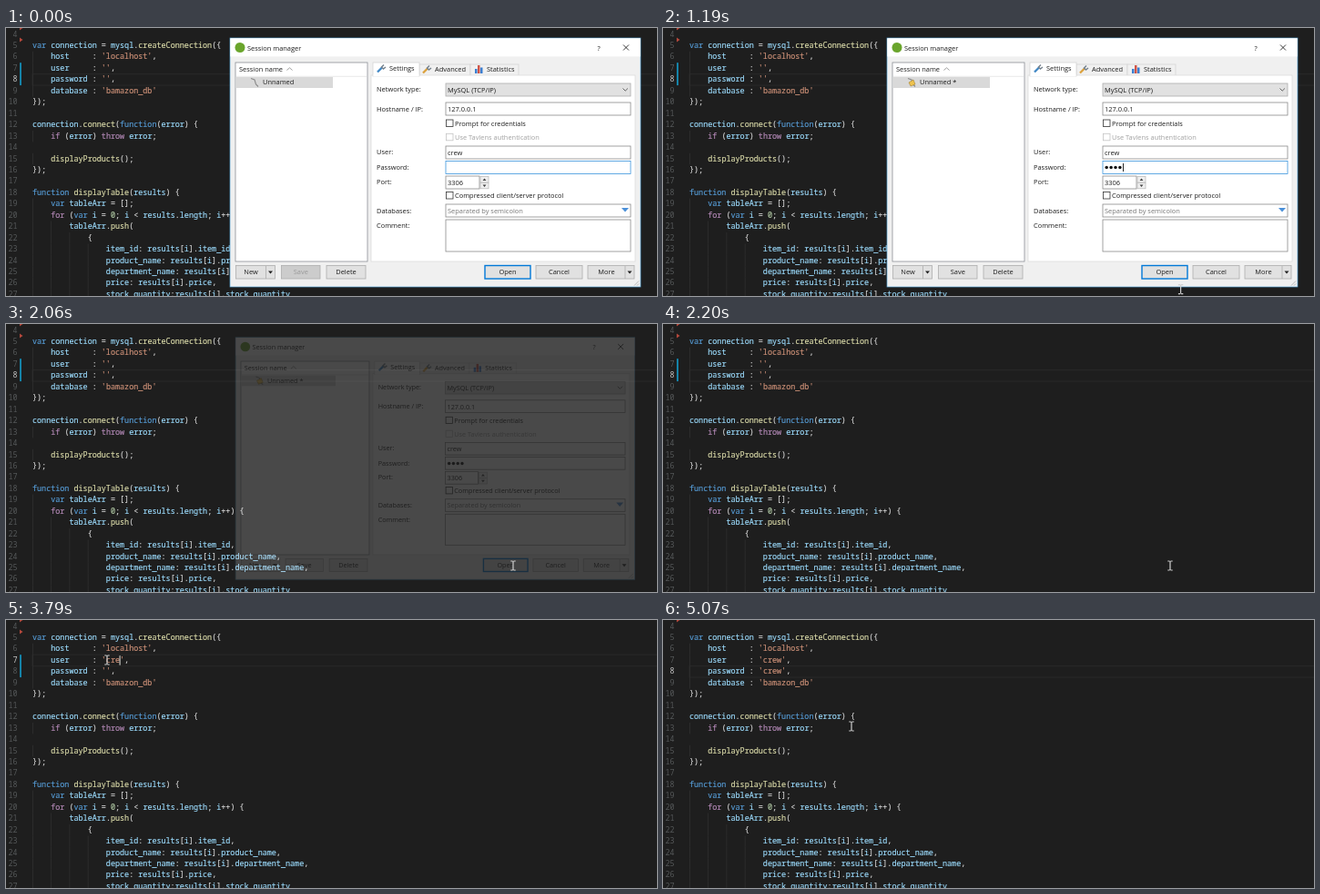
Animation of 715 by 295 pixels, one loop 5.09 s. Source, as an HTML page:

```html
<!DOCTYPE html>
<html lang="en">
<head>
<meta charset="utf-8">
<title>Session setup</title>
<style>
html, body { margin: 0; width: 100%; height: 100%; overflow: hidden; background: #1e1e1e; }
svg { display: block; width: 715px; height: 295px; }
text { white-space: pre; }
.code { font: 8.43px "Noto Sans Mono", "DejaVu Sans Mono", monospace; }
.ui { font: 7.45px "Open Sans", "Noto Sans", sans-serif; }
</style>
</head>
<body>
<svg id="stage" viewBox="0 0 715 295"></svg>
<script>
(() => {
const LOOP = 5090, CHAR = 5.058, LINE = 12.45, LEFT = 29;
const NAME = 'crew';
const stage = document.getElementById('stage');

function add(parent, tag, attrs, text) {
  const el = document.createElementNS('http://www.w3.org/2000/svg', tag);
  for (const key in attrs) el.setAttribute(key, attrs[key]);
  if (text !== undefined) el.textContent = text;
  parent.appendChild(el);
  return el;
}
const set = (el, attrs) => { for (const key in attrs) el.setAttribute(key, attrs[key]); };
const show = (el, on) => el.setAttribute('visibility', on ? 'visible' : 'hidden');
const group = parent => add(parent, 'g', {});
const rect = (p, x, y, width, height, fill, stroke = 'none', sw = 0.8) =>
  add(p, 'rect', { x, y, width, height, fill, stroke, 'stroke-width': sw });
const path = (p, d, stroke, sw = 1, fill = 'none') =>
  add(p, 'path', { d, stroke, 'stroke-width': sw, fill });
const label = (p, x, y, text, fill = '#1c1c1c', anchor = 'start') =>
  add(p, 'text', { x, y, fill, 'text-anchor': anchor, class: 'ui' }, text);

// ---- code editor ----
const userLine = s => `    user     : '${s}',`;
const passLine = s => `    password : '${s}',`;
const source = [
  '',
  'var connection = mysql.createConnection({',
  "    host     : 'localhost',",
  userLine(''),
  passLine(''),
  "    database : 'bamazon_db'",
  '});',
  '',
  'connection.connect(function(error) {',
  '    if (error) throw error;',
  '',
  '    displayProducts();',
  '});',
  '',
  'function displayTable(results) {',
  '    var tableArr = [];',
  '    for (var i = 0; i < results.length; i++) {',
  '        tableArr.push(',
  '            {',
  '                item_id: results[i].item_id,',
  '                product_name: results[i].product_name,',
  '                department_name: results[i].department_name,',
  '                price: results[i].price,',
  '                stock_quantity:results[i].stock_quantity'
];
const token = /('[^']*')|\b(var|function)\b|\b(if|throw|for)\b|(\w+)(?=\()|\b(\d+)\b|(\w+)|([^\w']+)/g;
const tints = ['#ce9178', '#569cd6', '#b58ab8', '#dcdcaa', '#b5cea8', '#9cdcfe', '#d4d4d4'];
const baseline = n => 22 + LINE * (n - 5);
const rowTop = n => baseline(n) - 8.7;

function paint(el, line) {
  if (el.shown === line) return;
  el.shown = line;
  el.textContent = '';
  for (const m of line.matchAll(token)) {
    const kind = m.slice(1).findIndex(part => part !== undefined);
    add(el, 'tspan', { fill: tints[kind], stroke: tints[kind] }, m[0]);
  }
}

rect(stage, 0, 0, 715, 295, '#1e1e1e');
const current = rect(stage, LEFT, 0, 690, LINE, 'none', '#292929', 1);
const numbers = {}, lines = {};
source.forEach((line, i) => {
  const n = i + 4, y = baseline(n);
  for (let col = 0; col < line.search(/\S/); col += 4)
    rect(stage, LEFT + col * CHAR, rowTop(n), 0.8, LINE, '#303030');
  numbers[n] = add(stage, 'text', { x: 12.5, y, 'text-anchor': 'end', class: 'code' }, n);
  lines[n] = add(stage, 'text', { x: LEFT, y, class: 'code', 'stroke-width': 0.15 });
  paint(lines[n], line);
});
const changed = rect(stage, 15, 0, 2, LINE, '#1583a8');
path(stage, 'M15 -2L18.5 0L15 2.5Z', 'none', 0, '#b5483c');
const removed = path(stage, 'M15 10.5L18.5 13L15 15.5Z', 'none', 0, '#b5483c');
const caret = rect(stage, 0, 0, 1.2, 10.5, '#c4c4c0');

// ---- session dialog ----
const dialog = group(stage);
rect(dialog, 246, 11, 451, 274, '#f0f0f0', '#4f9fd0', 0.7);
rect(dialog, 246.4, 11.4, 450.2, 20, '#fff');
add(dialog, 'circle', { cx: 257, cy: 21.5, r: 5.5, fill: '#6aa52c' });
label(dialog, 265, 24.5, 'Session manager');
label(dialog, 651, 25, '?', '#222', 'middle');
path(dialog, 'M678 18.5l6 6m0 -6l-6 6', '#222', 0.9);

rect(dialog, 252, 38, 145, 219, '#fff', '#8c9096');
path(dialog, 'M253 53.3H396', '#e4e4e4', 0.8);
path(dialog, 'M308.5 46.5l3 -2.7l3 2.7', '#777', 0.7);
label(dialog, 256, 48, 'Session name');
rect(dialog, 252.5, 54, 106.5, 12, '#d9d9d9');
path(dialog, 'M269 55.5l4 1.5l1.5 5l2.5 2.5', '#8a8a8a', 1.1);
const pencil = path(dialog, 'M270 60l5 -3l2 5l-5 2Z', '#94711f', 0.5, '#efc34e');
const session = label(dialog, 282, 62.3, 'Unnamed');

rect(dialog, 454, 40, 56, 12.5, '#f0f0f0', '#d5d5d5');
rect(dialog, 510, 40, 53, 12.5, '#f0f0f0', '#d5d5d5');
rect(dialog, 401, 52, 290, 205, '#fff', '#dcdcdc');
rect(dialog, 403, 38, 51, 15, '#fff', '#d5d5d5');
rect(dialog, 403.5, 51.3, 50, 2, '#fff');
function wrench(x, y, handle) {
  path(dialog, `M${x - 4} ${y + 4}L${x + 1} ${y - 1}`, handle, 2.3);
  path(dialog, `M${x + 3} ${y - 4}l-2.5 2.5l2 2l2.5 -2`, '#75828e', 1.5);
}
wrench(412, 44.5, '#3f87c5');
wrench(462, 45.5, '#dba13c');
rect(dialog, 515, 45, 2.5, 5, '#3c7fd0');
rect(dialog, 518, 41, 2.5, 9, '#d05548');
rect(dialog, 521, 43.5, 2.5, 6.5, '#3c7fd0');
label(dialog, 421, 47.3, 'Settings');
label(dialog, 471, 48, 'Advanced');
label(dialog, 528, 48, 'Statistics');

[['Network type:', 70], ['Hostname / IP:', 91.5], ['User:', 139], ['Password:', 156],
 ['Port:', 172], ['Databases:', 203.5], ['Comment:', 220]]
  .forEach(([text, y]) => label(dialog, 407, y, text));

const field = (y, h = 14, w = 203) => rect(dialog, 483, y, w, h, '#fff', '#8a8a8a');
set(field(61), { fill: '#e1e1e1', stroke: '#adadad' });
label(dialog, 485, 70.5, 'MySQL (TCP/IP)');
path(dialog, 'M677.5 66.5l2.7 2.7l2.7 -2.7', '#555', 0.9);
field(82);
label(dialog, 485, 92, '127.0.0.1');
field(130);
label(dialog, 485, 139.5, NAME);
const password = field(146.5);
const dots = [0, 1, 2, 3].map(i =>
  add(dialog, 'circle', { cx: 487.2 + i * 4.9, cy: 153.6, r: 1.75, fill: '#111' }));
const inputCaret = rect(dialog, 505, 149, 0.9, 9, '#111');
field(163, 14, 37);
label(dialog, 485, 172.8, '3306');
for (const y of [163.5, 170.3]) rect(dialog, 521, y, 9, 6.5, '#f0f0f0', '#b5b5b5', 0.7);
path(dialog, 'M523.5 168l2 -2.4l2 2.4ZM523.5 172.5l2 2.4l2 -2.4Z', 'none', 0, '#444');
field(194);
label(dialog, 485, 203.8, 'Separated by semicolon', '#777');
path(dialog, 'M676 198h8l-4 4.5Z', 'none', 0, '#4a8fd8');
field(211, 35);

function check(y, text, off) {
  rect(dialog, 483.5, y, 7.5, 7.5, '#fff', off ? '#c4c4c4' : '#333');
  label(dialog, 493, y + 6.6, text, off ? '#a0a0a0' : undefined);
}
check(101, 'Prompt for credentials');
check(116.3, 'Use Tavlens authentication', true);
check(180.5, 'Compressed client/server protocol');

function button(x, w, text, split) {
  const box = rect(dialog, x, 261.5, w + (split ? 10 : 0), 14.5, '#e1e1e1', '#adadad');
  const caption = label(dialog, x + w / 2, 271.4, text, '#1c1c1c', 'middle');
  if (split) {
    path(dialog, `M${x + w} 262V276`, '#adadad', 0.8);
    path(dialog, `M${x + w + 2.5} 267.5h5l-2.5 3Z`, 'none', 0, '#222');
  }
  return { box, caption };
}
button(252.5, 33, 'New', true);
const save = button(302.5, 42.5, 'Save');
button(352, 43, 'Delete');
const connect = button(526, 50, 'Open');
set(connect.box, { stroke: '#0078d7', 'stroke-width': 1.4 });
button(582, 51, 'Cancel');
button(639, 41, 'More', true);
path(dialog, 'M690 283.5l5 -5M693 283.5l2 -2', '#a8a8a8', 0.8);

// ---- pointer ----
const pointer = group(stage);
const beam = path(pointer, 'M-2.7 -5H-.5M.5 -5H2.7M0 -5V5M-2.7 5H-.5M.5 5H2.7', '#d0d0d0', 1.2);
const arrow = path(pointer, 'M0 -3V7.5L2.4 5.2L4.1 9L5.6 8.3L4 4.7H7.4Z', '#222', 0.6, '#fff');
const busy = group(pointer);
add(busy, 'circle', { r: 4.8, fill: 'none', stroke: '#2f86d6', 'stroke-width': 2.3 });
const glint = path(busy, 'M0 -4.8A4.8 4.8 0 0 1 4.8 0', '#a9d6f8', 2.3);

// time, x, y
const route = [
  [960, 582.5, 308.6], [1430, 554, 265.5], [1980, 554, 265.5], [2060, 557, 266],
  [2380, 557, 266], [2890, 111, 44], [3870, 111, 44], [3980, 111, 56],
  [4020, 111, 56], [4250, 205, 121], [4410, 205, 121], [4930, 207, 117]
];
function place(t) {
  if (t <= route[0][0]) return route[0].slice(1);
  for (let i = 1; i < route.length; i++) {
    const [t0, x0, y0] = route[i - 1], [t1, x1, y1] = route[i];
    if (t < t1) {
      const p = (t - t0) / (t1 - t0), e = p * p * (3 - 2 * p);
      return [x0 + (x1 - x0) * e, y0 + (y1 - y0) * e];
    }
  }
  return route[route.length - 1].slice(1);
}
const typed = (t, start, end) =>
  t < start ? 0 : Math.min(4, 1 + Math.floor((t - start) / (end - start) * 3));

function drawEditor(t) {
  const user = typed(t, 3330, 3850), pass = typed(t, 4410, 4850);
  const line = t >= 2930 && t < 3990 ? 7 : 8;
  paint(lines[7], userLine(NAME.slice(0, user)));
  paint(lines[8], passLine(NAME.slice(0, pass)));
  for (const n in numbers) numbers[n].setAttribute('fill', +n === line ? '#c6c6c6' : '#555859');
  current.setAttribute('y', rowTop(line));
  set(changed, t < 3900 ? { y: rowTop(7), height: LINE * 2 } : { y: rowTop(8), height: LINE });
  show(changed, t < 4900);
  show(removed, t < 3900);
  set(caret, { x: LEFT + CHAR * (16 + (line === 7 ? user : pass)) - 0.6, y: rowTop(line) + 1 });
  show(caret, t >= 2930 && t < 4930);
}

function drawDialog(t) {
  const fade = Math.min(1, Math.max(0, (t - 1980) / 100));
  const count = typed(t, 470, 770), dirty = count > 0, focus = t < 1640;
  const scale = 1 - 0.034 * fade;
  show(dialog, fade < 1);
  set(dialog, {
    opacity: 1 - fade,
    transform: `translate(468 148) scale(${scale}) translate(-468 -148)`
  });
  session.textContent = dirty ? 'Unnamed *' : 'Unnamed';
  pencil.setAttribute('opacity', dirty ? 1 : 0);
  save.box.setAttribute('fill', dirty ? '#e1e1e1' : '#cccccc');
  save.caption.setAttribute('fill', dirty ? '#1c1c1c' : '#999');
  dots.forEach((dot, i) => dot.setAttribute('opacity', i < count ? 1 : 0));
  inputCaret.setAttribute('x', 485.5 + count * 4.9);
  inputCaret.setAttribute('opacity', focus && dirty ? 1 : 0);
  password.setAttribute('stroke', focus ? '#3b95dc' : '#8a8a8a');
  connect.box.setAttribute('fill',
    t < 1400 || t >= 2000 ? '#e1e1e1' : t < 1600 ? '#e5f1fb' : '#cce4f7');
}

function drawPointer(t) {
  const [x, y] = place(t);
  const waiting = t >= 1780 && t < 1980;
  const overDialog = t < 1980 && y < 285;
  pointer.setAttribute('transform', `translate(${x} ${y})`);
  show(beam, !overDialog);
  show(arrow, overDialog && !waiting);
  show(busy, waiting);
  glint.setAttribute('transform', `rotate(${(t - 1780) * 0.4})`);
}

function tick(now) {
  const t = now % LOOP;
  drawEditor(t);
  drawDialog(t);
  drawPointer(t);
  requestAnimationFrame(tick);
}
tick(0);
})();
</script>
</body>
</html>
```
